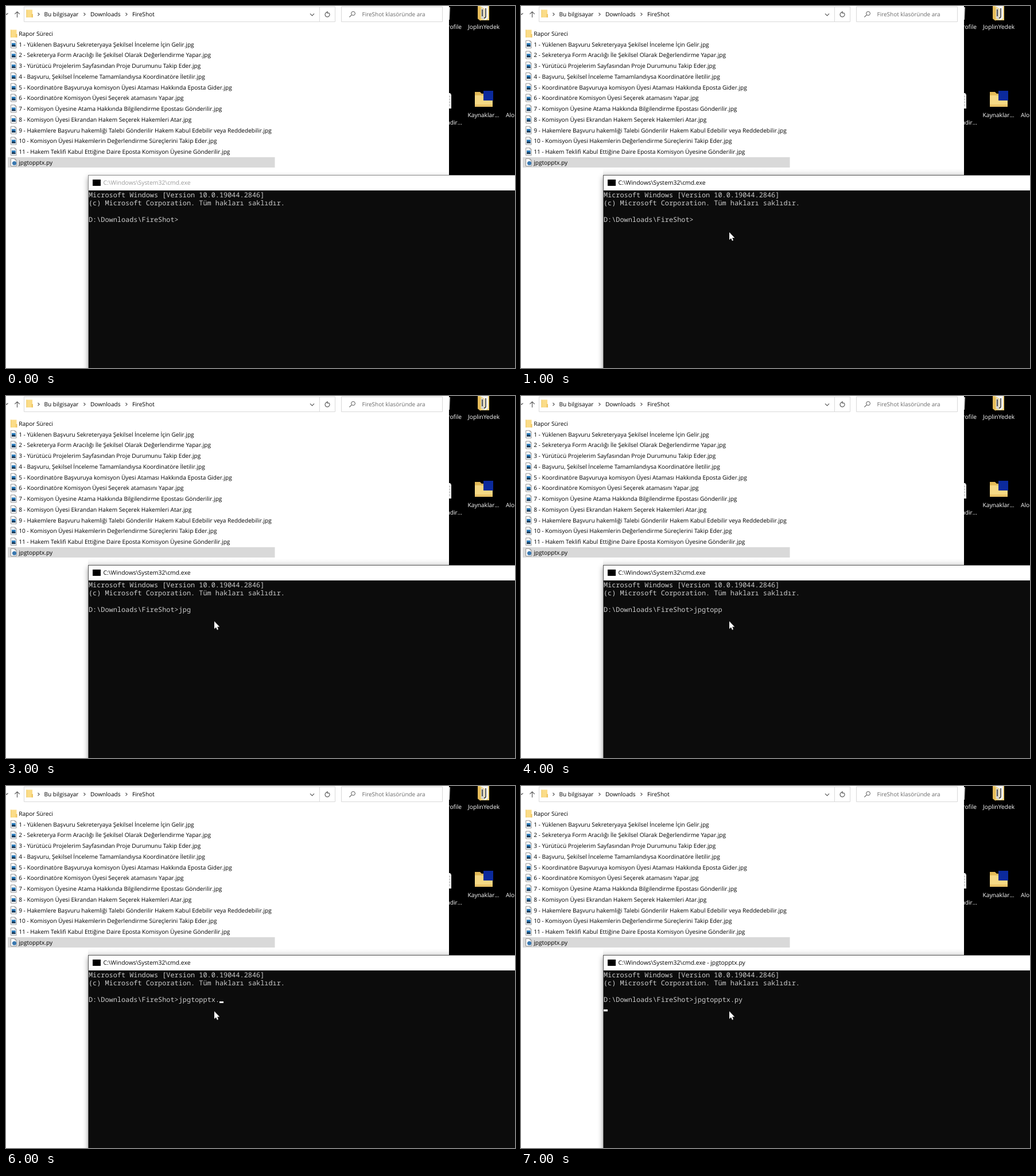
These frames come from a looping animation (887x632 px, 8000 ms). An HTML page:

```html
<!DOCTYPE html>
<html lang="tr">
<head>
<meta charset="utf-8">
<title>Komut satırı</title>
<style>
html, body { margin: 0; width: 100%; height: 100%; overflow: hidden; background: #fff; }
svg { display: block; width: 887px; height: 632px; }
text { font: 10.1px "Open Sans", "Noto Sans", sans-serif; text-rendering: geometricPrecision; white-space: pre; }
.con { font: 11.88px "Noto Sans Mono", monospace; fill: #ccc; }
.title { font-size: 10.38px; animation: title 8s step-end infinite; }
.desk { font-size: 10.25px; fill: #fff; }
.line { fill: none; stroke: #5a5a5a; stroke-width: 1.2; }
.shadow { filter: drop-shadow(0 4px 5px rgba(0, 0, 0, .4)); }

.at1, .at3, .at4, .at5, .at6, .at7, .only6 { animation: 8s step-end infinite; }
.at1 { animation-name: at1; }
.at3 { animation-name: at3; }
.at4 { animation-name: at4; }
.at5 { animation-name: at5; }
.at6 { animation-name: at6; }
.at7 { animation-name: at7; }
.only6 { animation-name: only6; }
.pointer { animation: nudge 8s step-end infinite; }
@keyframes at1 { 0% { visibility: hidden } 12.5%, to { visibility: visible } }
@keyframes at3 { 0% { visibility: hidden } 37.5%, to { visibility: visible } }
@keyframes at4 { 0% { visibility: hidden } 50%, to { visibility: visible } }
@keyframes at5 { 0% { visibility: hidden } 62.5%, to { visibility: visible } }
@keyframes at6 { 0% { visibility: hidden } 75%, to { visibility: visible } }
@keyframes at7 { 0% { visibility: hidden } 87.5%, to { visibility: visible } }
@keyframes only6 { 0% { visibility: hidden } 75% { visibility: visible } 87.5%, to { visibility: hidden } }
@keyframes title { 0% { fill: #999 } 12.5%, to { fill: #000 } }
@keyframes nudge { 0% { transform: translate(363px, 395px) } 25%, to { transform: translate(363px, 393.3px) } }
</style>
</head>
<body>
<svg viewBox="0 0 887 632">
  <defs>
    <g id="folder">
      <path d="M.5.5H11V14H.5Z" fill="#fbdc88"/>
      <path d="M.5.5H1.5V14H.5Z" fill="#edc765"/>
      <path d="M9.5 8H12V14H9.5Z" fill="#efc766"/>
    </g>
    <g id="page">
      <path d="M.5.5H7.5L10 3V13.5H.5Z" fill="#fff" stroke="#8b8b8b" stroke-width=".9"/>
      <path d="M7.5.5V3H10" fill="none" stroke="#8b8b8b" stroke-width=".8"/>
    </g>
    <g id="photo">
      <use href="#page"/>
      <path d="M2 5H8.6V11H2Z" fill="#2477b8"/>
      <path d="M2 11V9.2L4.2 7.4 6 9 7 8.2 8.6 9.6V11Z" fill="#17304a"/>
    </g>
    <path id="chev" d="M0 0 2.6 2.6 0 5.2" class="line"/>
    <linearGradient id="shade" x2="0" y2="1">
      <stop stop-opacity="0"/><stop offset="1" stop-opacity=".08"/>
    </linearGradient>
    <clipPath id="screen"><path d="M772 0H887V295H772Z"/></clipPath>
  </defs>

  <rect width="887" height="632" fill="#fff"/>

  <!-- address bar -->
  <path d="M31.5 1.5H573.5V27.5H31.5ZM546.5 1.5V27.5M584.5 1.5H760.5V27.5H584.5Z" fill="none" stroke="#d9d9d9"/>
  <path d="M-1 13 1 15 3.5 12.5" class="line"/>
  <path d="M19.5 20V10M15.3 14.2 19.5 10 23.7 14.2" class="line" stroke-width="1.4"/>
  <use href="#folder" x="35" y="6"/>
  <use href="#chev" x="55.5" y="12"/>
  <use href="#chev" x="135.5" y="12"/>
  <use href="#chev" x="208.5" y="12"/>
  <text x="66.5" y="18">Bu bilgisayar</text>
  <text x="147" y="18">Downloads</text>
  <text x="220" y="18">FireShot</text>
  <path d="M530 13.3 533.5 16.8 537 13.3" class="line" stroke-width="1.4"/>
  <path d="M563.2 12.5A4 4 0 1 1 560.5 11M560 9V12.4H563.4" class="line"/>
  <path d="M602.4 15.6 598.3 19.4" class="line"/>
  <circle cx="605" cy="13" r="3.4" class="line" style="stroke-width:1"/>
  <text x="620.5" y="18" fill="#6a6a6a" style="font-size:9.95px">FireShot klasöründe ara</text>

  <!-- file list -->
  <rect x="3" y="264" width="465.5" height="18" fill="#d9d9d9"/>
  <g id="files"></g>

  <!-- console shadow, covered by the desktop on the right -->
  <rect class="shadow" x="143" y="295" width="900" height="500"/>
  <rect class="at1" x="143" y="284" width="629" height="11" fill="url(#shade)"/>

  <!-- desktop -->
  <g clip-path="url(#screen)">
    <rect x="772" width="115" height="295" fill="#000"/>
    <path d="M771 2H774L773 24H771Z" fill="#c9c9c9"/>
    <path d="M771 152H774L776 155V179H771Z" fill="#ececec"/>
    <path d="M771 158h3M771 163h3M771 168h3M771 173h3" stroke="#999"/>
    <path d="M822 0H842V25H826L822 22Z" fill="#f2d47c"/>
    <path d="M826 0H840V22L834 25V5Z" fill="#f4f4f4"/>
    <path d="M828 3 833 6V25L828 21Z" fill="#d6d6d6"/>
    <path d="M836 4V18Q836 21 833 21M830 6V18" fill="none" stroke="#333" stroke-width="1.6"/>
    <path d="M822 0 827 3V26L822 22Z" fill="#e5bb58"/>
    <path d="M817 150H826L829 153H847V176H817Z" fill="#e3ba58"/>
    <path d="M817 156H848V176H817Z" fill="#f6d985"/>
    <path d="M817 172H848V176H817Z" fill="#ebc468"/>
    <rect x="832" y="148" width="17" height="17" fill="#0b2a9c"/>
    <text x="794" y="40" text-anchor="end" class="desk">profile</text>
    <text x="832.5" y="40" text-anchor="middle" class="desk">JoplinYedek</text>
    <text x="832" y="193.5" text-anchor="middle" class="desk">Kaynaklar...</text>
    <text x="795" y="207" text-anchor="end" class="desk">ndir...</text>
    <text x="871" y="193.5" class="desk">Alo</text>
  </g>

  <!-- console window -->
  <rect x="143" y="295" width="744" height="337" fill="#8a8a8a"/>
  <path class="at1" d="M143 295H887V296H144V632H143Z" fill="#555"/>
  <rect x="144" y="296" width="743" height="26" fill="#fff"/>
  <rect x="144" y="322" width="743" height="310" fill="#0c0c0c"/>
  <rect x="151" y="303" width="14" height="11" fill="#000"/>
  <text class="title" x="169.5" y="312.4">C:\Windows\System32\cmd.exe<tspan class="at7"> - jpgtopptx.py</tspan></text>
  <text class="con" x="144" y="333.8">Microsoft Windows [Version 10.0.19044.2846]</text>
  <text class="con" x="144" y="348.1">(c) Microsoft Corporation. Tüm hakları saklıdır.</text>
  <text class="con" x="144" y="376.6">D:\Downloads\FireShot&gt;<tspan class="at3">jpg</tspan><tspan class="at4">topp</tspan><tspan class="at5">tx</tspan><tspan class="at6">.</tspan><tspan class="at7">py</tspan></text>
  <rect class="only6" x="372" y="376" width="7" height="3" fill="#f2f2f2"/>
  <rect class="at7" x="144" y="390" width="7" height="3.5" fill="#f2f2f2"/>
  <g class="at1">
    <path class="pointer" d="M0 0V13.3L3 10.6 5 15 7.1 14.1 5.1 9.8H9.3Z" fill="#fff"/>
  </g>
</svg>
<script>
const names = [
  "Rapor Süreci",
  "1 - Yüklenen Başvuru Sekreteryaya Şekilsel İnceleme İçin Gelir.jpg",
  "2 - Sekreterya Form Aracılığı İle Şekilsel Olarak Değerlendirme Yapar.jpg",
  "3 - Yürütücü Projelerim Sayfasından Proje Durumunu Takip Eder.jpg",
  "4 - Başvuru, Şekilsel İnceleme Tamamlandıysa Koordinatöre İletilir.jpg",
  "5 - Koordinatöre Başvuruya komisyon Üyesi Ataması Hakkında Eposta Gider.jpg",
  "6 - Koordinatöre Komisyon Üyesi Seçerek atamasını Yapar.jpg",
  "7 - Komisyon Üyesine Atama Hakkında Bilgilendirme Epostası Gönderilir.jpg",
  "8 - Komisyon Üyesi Ekrandan Hakem Seçerek Hakemleri Atar.jpg",
  "9 - Hakemlere Başvuru hakemliği Talebi Gönderilir Hakem Kabul Edebilir veya Reddedebilir.jpg",
  "10 - Komisyon Üyesi Hakemlerin Değerlendirme Süreçlerini Takip Eder.jpg",
  "11 - Hakem Teklifi Kabul Ettiğine Daire Eposta Komisyon Üyesine Gönderilir.jpg",
  "jpgtopptx.py"
];

const icon = (name, y) => {
  if (name.endsWith(".jpg")) return `<use href="#photo" x="8" y="${y - 7}"/>`;
  if (name.endsWith(".py"))
    return `<use href="#page" x="8" y="${y - 7}"/><circle cx="14.5" cy="${y + 1.5}" r="3.6" fill="#3a78b0"/>`;
  return `<use href="#folder" x="7.5" y="${y - 7}"/>`;
};

document.getElementById("files").innerHTML = names.map((name, i) => {
  const y = 48 + i * 18.75;
  return `${icon(name, y)}<text x="22.2" y="${y + 3.8}">${name}</text>`;
}).join("");
</script>
</body>
</html>
```
